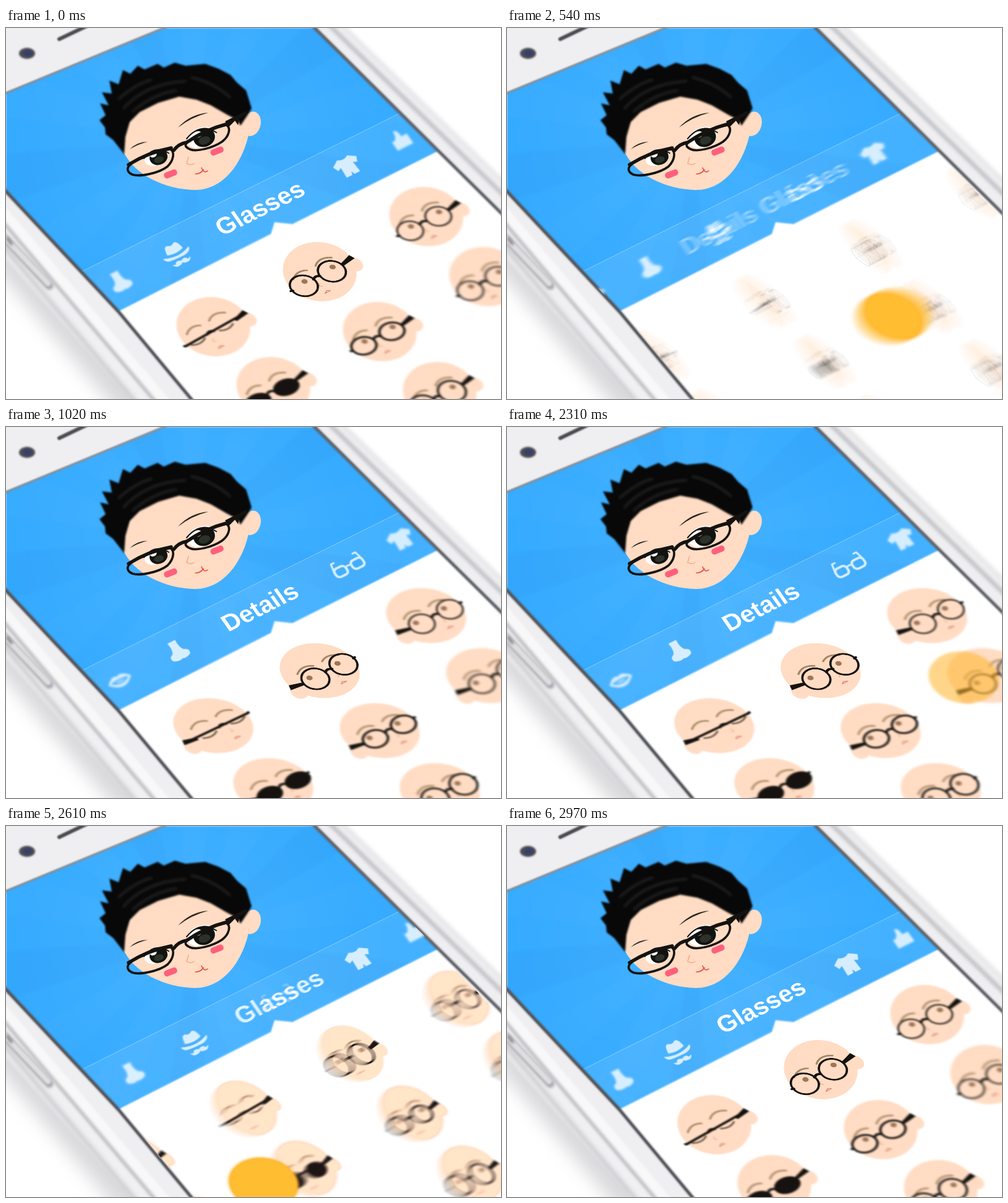
Recreate the animation shown at these times as an HTML page with a canvas. Size 800 by 600 pixels, loop 3.57 s.

```html
<!DOCTYPE html>
<html>
<head>
<meta charset="utf-8">
<style>
html, body { margin: 0; width: 100%; height: 100%; overflow: hidden; background: #fff; }
canvas { display: block; }
</style>
</head>
<body>
<canvas id="stage" width="800" height="600"></canvas>
<script>
const LOOP = 3570, STEP = 30, SWIPE = 660, SWIPE_RIGHT = 360, SWIPE_LEFT = 2310;
const SKIN = '#ffdcc3', INK = '#15120f';

const ctx = document.getElementById('stage').getContext('2d');
const clamp = x => Math.max(0, Math.min(1, x));
const mix = (a, b, p) => a + (b - a) * p;

function makeCanvas(w, h) {
  const c = document.createElement('canvas');
  c.width = w;
  c.height = h;
  return c.getContext('2d');
}

function fill(g, path, color, blur = 0) {
  g.filter = blur ? `blur(${blur}px)` : 'none';
  g.fillStyle = color;
  g.fill(new Path2D(path));
  g.filter = 'none';
}

function stroke(g, path, color, width, blur = 0) {
  g.filter = blur ? `blur(${blur}px)` : 'none';
  g.strokeStyle = color;
  g.lineWidth = width;
  g.stroke(new Path2D(path));
  g.filter = 'none';
}

function ellipse(g, x, y, rx, ry, angle, color, line) {
  g.beginPath();
  g.ellipse(x, y, rx, ry, angle, 0, 7);
  if (line) {
    g.strokeStyle = color;
    g.lineWidth = line;
    g.stroke();
  } else {
    g.fillStyle = color;
    g.fill();
  }
}

// A square picture centred on the origin, kept at double resolution.
function makeSprite(size, blur, draw) {
  const sharp = makeCanvas(size * 2, size * 2);
  sharp.setTransform(2, 0, 0, 2, size, size);
  sharp.lineCap = sharp.lineJoin = 'round';
  draw(sharp);
  const soft = makeCanvas(size * 2, size * 2);
  if (blur) soft.filter = `blur(${blur * 2}px)`;
  soft.drawImage(sharp.canvas, 0, 0);
  return { image: soft.canvas, size };
}

function drawSprite(g, sprite, x, y, axes, flip = 1) {
  const s = sprite.size;
  g.setTransform(axes[0] * flip, axes[1] * flip, axes[2], axes[3], x, y);
  g.drawImage(sprite.image, -s / 2, -s / 2, s, s);
}

// ---- still parts -------------------------------------------------------

const SCREEN = 'M0 105L256 0H498L698 199L800 301V600H301L182 458L0 263Z';
const HEADER = 'M0 105L256 0H498L698 199L463 317L434 314L428 333L182 458L0 263Z';
const BAND = 'M122 394L636 138L698 199L182 458Z';
const LIST = 'M185 459L428 333L434 314L463 317L695 201L796 303H800V600H304Z';

function drawPhone(g) {
  g.fillStyle = '#fff';
  g.fillRect(0, 0, 800, 600);
  fill(g, 'M-20 300L-20 385L180 620H300Z', '#d9d9dc', 14);
  fill(g, 'M-20 -20H525L820 268V620H220L-20 350Z', '#efeff1', 3);
  stroke(g, 'M517 -10L810 276', '#c3c4c8', 7, 2.5);
  stroke(g, 'M536 -10L810 256', '#e6e6e8', 8, 3);
  stroke(g, 'M-10 290L262 610', '#f8f8f9', 15, 2);
  stroke(g, 'M-10 308L246 610', '#bdbdc2', 5, 2);
  stroke(g, 'M-10 325L232 610', '#f0f0f2', 9, 2);
  stroke(g, 'M-10 347L214 610', '#c9c9cd', 6, 3);
  g.lineCap = 'round';
  stroke(g, 'M-5 337L70 417', '#a9a9ae', 13, 2);
  stroke(g, 'M-6 335L68 413', '#dededf', 9, 1.5);
  stroke(g, 'M2 340L9 349', '#77777c', 4, 2);

  fill(g, SCREEN, '#fff');
  g.save();
  g.clip(new Path2D(SCREEN));
  fill(g, HEADER, '#33aaff', 1);
  g.clip(new Path2D(HEADER));
  const glow = g.createRadialGradient(300, 180, 60, 300, 180, 330);
  glow.addColorStop(0, 'rgba(255,255,255,.07)');
  glow.addColorStop(1, 'rgba(255,255,255,0)');
  fill(g, HEADER, glow);
  for (let i = 0; i < 14; i++) {
    const a = i * Math.PI / 7 + .12, b = a + .25;
    fill(g, `M300 180L${300 + 600 * Math.cos(a)} ${180 + 600 * Math.sin(a)}` +
      `L${300 + 600 * Math.cos(b)} ${180 + 600 * Math.sin(b)}Z`,
      i % 3 ? 'rgba(255,255,255,.02)' : 'rgba(0,70,170,.03)', 2);
  }
  fill(g, BAND, 'rgba(255,255,255,.08)');
  stroke(g, 'M122 394L636 138', 'rgba(255,255,255,.35)', 1);
  g.restore();

  stroke(g, 'M-5 107L262 -3', '#75828f', 3, 1.3);
  stroke(g, 'M494 -5L698 198L810 309', '#55585f', 5, 1.4);
  stroke(g, 'M-5 259L182 459L306 608', '#46484e', 5, 1.4);
  stroke(g, 'M86 18L132 -4', '#4b4a4f', 6, 1.2);
  g.filter = 'blur(1.5px)';
  ellipse(g, 34, 41, 13, 9, 0, '#4c4a52');
  ellipse(g, 35, 41, 7, 5, 0, '#35406a');
  g.filter = 'none';
}

function drawAvatar(g) {
  g.lineCap = g.lineJoin = 'round';
  ellipse(g, 397, 155, 14.5, 20, .25, SKIN);
  fill(g, 'M188 196C185 150 230 100 285 100C340 100 396 130 392 172C384 212 355 262 305 262C258 261 205 238 188 196Z', SKIN);
  fill(g, 'M191 204L173 181L161 172L160 161L151 149L161 141L152 122L166 125L155 104L171 106' +
    'L167 85L182 91L189 68L201 74L213 61L224 67L245 58L255 64L273 56L290 61L322 58L344 66' +
    'L363 76L373 88L388 101L397 130L391 140L379 158L374 149L357 140L331 125L308 116' +
    'L280 111L246 121L216 136L200 152L193 176Z', '#080808', 1.6);
  stroke(g, 'M190 130Q225 90 290 86M182 115Q210 90 235 84M300 80Q335 88 362 112M205 135Q235 108 275 101',
    'rgba(100,100,105,.35)', 3, 2);

  fill(g, 'M200 196Q212 184 229 184Q213 188 200 196Z', '#2a2520', .5);
  fill(g, 'M278 161Q298 139 327 137Q300 144 278 161Z', '#2a2520', .5);
  drawEye(g, 243, 209, 20, 13);
  drawEye(g, 316, 177, 24, 16);
  stroke(g, 'M198 224C209 210 245 199 266 196C273 201 271 214 261 224C247 235 216 241 204 237C197 234 195 229 198 224Z', INK, 3.6);
  stroke(g, 'M291 187C304 173 333 161 356 157C364 161 361 175 349 184C334 194 308 201 297 196C291 193 289 191 291 187Z', INK, 3.6);
  stroke(g, 'M198 221Q230 201 267 194M271 198Q279 187 292 185Q323 164 358 155', INK, 5.5);
  fill(g, 'M354 151L388 134L390 139L377 147L375 157L370 150L360 160Z', INK);
  for (const [x, y] of [[266, 236], [341, 199]]) {
    g.save();
    g.translate(x, y);
    g.rotate(-.38);
    g.fillStyle = '#ff5f7c';
    g.beginPath();
    g.roundRect(-11, -5, 22, 10, 4.5);
    g.fill();
    g.restore();
  }
  stroke(g, 'M295 209L292 219Q299 223 304 219', '#efb08f', 1.6);
  stroke(g, 'M306 236Q315 236 319 229M316 226Q320 236 326 231', '#e84e45', 1.6);
}

function drawEye(g, x, y, rx, ry) {
  ellipse(g, x, y, rx, ry, -.35, '#fff');
  ellipse(g, x + rx * .18, y, rx * .74, ry * .95, -.35, '#11130f');
  ellipse(g, x + rx * .2, y + ry * .3, rx * .4, ry * .4, -.3, '#2c3129');
  ellipse(g, x - rx * .25, y - ry * .3, rx * .28, ry * .32, -.35, '#fff');
  stroke(g, `M${x - rx} ${y + 2}Q${x - 3} ${y - ry - 8} ${x + rx} ${y - ry * .5}`, INK, 2);
}

// ---- list of faces -----------------------------------------------------

const FACE_AXES = [.888, -.46, .707, .707];
const STYLES = {
  line: { rx: 0 },
  round: { rx: 20, ry: 20, width: 3.2 },
  thin: { rx: 19, ry: 18, width: 2.4 },
  oval: { rx: 19, ry: 16, width: 3.5 },
  shade: { rx: 21, ry: 15, filled: true }
};
const GRID = [
  [['line', 1.3], ['round', .3], ['thin', 1.6]],
  [['shade', 1.6], ['oval', 1.5], ['thin', 2]],
  [['oval', 2], ['round', 1.8], ['oval', 2]]
];

const faces = GRID.map(row => row.map(([name, blur]) => makeSprite(160, blur, g => {
  const style = STYLES[name];
  ellipse(g, 50, 16, 12, 14, 0, SKIN);
  ellipse(g, 0, 0, 57, 52.4, -Math.PI / 4, SKIN);
  stroke(g, 'M-41 -9Q-27 -20 -14 -12M2 -12Q16 -23 31 -12', '#a58763', 3);
  stroke(g, 'M-15 18Q-20 23 -14 24', '#e6a98d', 1.2);
  stroke(g, 'M-20 37L-14 34L-10 37Z', '#dd8878', 1.3);
  for (const x of [-36, 15]) {
    if (!style.rx) stroke(g, `M${x - 12} 11Q${x} 18 ${x + 12} 11`, '#604f40', 2.5);
    else if (style.filled) ellipse(g, x, 11, style.rx, style.ry, 0, INK);
    else {
      ellipse(g, x + 6, 3, 4.5, 4.5, 0, '#9b7658');
      ellipse(g, x, 9, style.rx, style.ry, 0, INK, style.width);
    }
  }
  if (!style.rx) stroke(g, 'M-57 8L54 4', INK, 4);
  stroke(g, 'M-58 7L-55 8M-17 7Q-10 2 -5 7', INK, 4);
  fill(g, 'M33 5L55 -2L58 7L35 10Z', INK);
})));

const stripEase = k => 1 - (1 - clamp((k - 60) / (SWIPE - 60))) ** 3;

function drawFaces(g, k, toRight, weight) {
  const p = 1 - (1 - clamp(k / SWIPE)) ** 2;
  const direction = toRight ? 1 : -1;
  const shift = direction * (p < .5 ? p : p - 1);
  const turn = Math.cos(Math.PI * stripEase(k));
  const flip = direction * Math.sign(turn) * Math.max(.3, Math.abs(turn));
  g.globalAlpha = weight * Math.min(1, .4 + Math.abs(turn));
  for (let row = 0; row < 3; row++)
    for (let col = -2; col < 4; col++) {
      const c = col + shift;
      drawSprite(g, faces[row][(col + 3) % 3], 335 + 172 * c + 97 * row, 483 - 89 * c + 97 * row, FACE_AXES, flip);
    }
}

// ---- category strip ----------------------------------------------------

const STRIP_AXES = [.893, -.449, .56, .81];
const SLOTS = [[97, 455], [184, 410], [277, 362], [410, 291], [552, 223], [638, 181], [730, 135]];

const solid = path => g => fill(g, path, '#fff');
const ICONS = [
  g => {
    fill(g, 'M-20 0Q-8 -14 0 -8Q8 -14 20 0Q0 22 -20 0Z', '#fff');
    stroke(g, 'M-13 0Q0 -3 13 0Q0 8 -13 0', '#55b7ff', 3);
  },
  solid('M-7 -18H7Q5 -5 10 2Q19 5 15 13Q6 18 0 15Q-6 18 -15 13Q-19 5 -10 2Q-5 -5 -7 -18Z'),
  g => {
    g.translate(-3, 4);
    fill(g, 'M-14 -6Q-12 -23 -5 -20Q0 -16 5 -20Q12 -23 14 -6Q0 -1 -14 -6Z', '#fff');
    fill(g, 'M-23 -4Q0 7 23 -4Q23 4 10 6Q-10 6 -18 4Q-23 1 -23 -4Z', '#fff');
    fill(g, 'M0 12Q8 7 11 14L16 12Q13 20 6 18Q2 18 0 15Q-2 18 -6 18Q-13 20 -16 12L-11 14Q-8 7 0 12Z', '#fff');
  },
  g => {
    g.strokeStyle = '#fff';
    g.lineWidth = 4;
    for (const x of [-25, 5]) {
      g.beginPath();
      g.roundRect(x, -3, 20, 16, 6);
      g.stroke();
    }
    stroke(g, 'M-5 3Q0 -1 5 3M-25 1L-22 -13L-17 -13M25 1L22 -13L17 -13', '#fff', 3);
  },
  solid('M-9 -16Q0 -10 9 -16L21 -8L17 1L11 -2L12 17H2L0 11L-2 17H-12L-11 -2L-17 1L-21 -8Z'),
  solid('M-3 -18Q4 -19 4 -5H14V14H-14V-3H-9Q-3 -8 -3 -18Z')
];
const icons = ICONS.map(draw => [.4, 1.8].map(blur => makeSprite(72, blur, draw)));

const label = text => makeSprite(190, .3, g => {
  g.font = 'bold 40px "Liberation Sans", Arial, sans-serif';
  g.textAlign = 'center';
  g.textBaseline = 'middle';
  g.fillStyle = '#fff';
  g.fillText(text, 0, 3);
});
const labels = { 2: label('Details'), 3: label('Glasses') };

function drawStrip(g, k, toRight, weight) {
  const p = stripEase(k);
  const focus = toRight ? 3 - p : 2 + p;
  icons.forEach((sprites, i) => {
    const slot = i - focus + 3;
    const left = Math.max(0, Math.min(5, Math.floor(slot)));
    const [a, b] = [SLOTS[left], SLOTS[left + 1]];
    const x = mix(a[0], b[0], slot - left), y = mix(a[1], b[1], slot - left);
    const distance = Math.abs(i - focus);
    g.globalAlpha = weight * .78 * (labels[i] ? clamp(distance * 1.4) : 1);
    drawSprite(g, sprites[distance > 1.4 ? 1 : 0], x, y, STRIP_AXES);
    if (labels[i]) {
      g.globalAlpha = weight * clamp(1.15 - distance * 1.5);
      drawSprite(g, labels[i], x, y, STRIP_AXES);
    }
  });
}

// ---- touch dot ---------------------------------------------------------

const dot = makeSprite(130, 2, g => ellipse(g, 0, 0, 50, 50, 0, '#ffb52a'));

function drawDot(g, k, toRight, weight) {
  const u = clamp(k / 300), p = u * u * (3 - 2 * u);
  const along = toRight ? 1 - p : p;
  g.globalAlpha = weight;
  drawSprite(g, dot, mix(738, 416, along), mix(405, 578, along), FACE_AXES);
}

// ---- playback ----------------------------------------------------------

const still = makeCanvas(800, 600);
drawPhone(still);
drawAvatar(still);

const layer = makeCanvas(800, 600);

// Averages several moments around k, then puts the result on the stage.
function smear(draw, k, toRight, shutter, clip, alpha = 1) {
  const count = shutter > 1 ? 10 : 1;
  layer.setTransform(1, 0, 0, 1, 0, 0);
  layer.clearRect(0, 0, 800, 600);
  layer.globalCompositeOperation = 'lighter';
  for (let i = 0; i < count; i++) {
    const offset = count > 1 ? i / (count - 1) - .5 : 0;
    draw(layer, k + shutter * offset, toRight, 1 / count);
  }
  ctx.save();
  if (clip) ctx.clip(new Path2D(clip));
  ctx.globalAlpha = alpha;
  ctx.drawImage(layer.canvas, 0, 0);
  ctx.restore();
}

function render(time) {
  const t = Math.floor(time % LOOP / STEP) * STEP;
  const toRight = t < SWIPE_LEFT;
  const k = t - (toRight ? SWIPE_RIGHT : SWIPE_LEFT);
  const shutter = k > 0 && k < SWIPE ? 110 * (1 - k / SWIPE) ** 2 : 0;

  ctx.drawImage(still.canvas, 0, 0);
  smear(drawFaces, k, toRight, shutter, LIST);
  smear(drawStrip, k, toRight, shutter / 3, BAND);
  if (k >= 0 && k < 390) {
    const alpha = Math.min(1, .55 + k / 130) * clamp((390 - k) / 90);
    smear(drawDot, k, toRight, k ? 15 : 0, null, alpha);
  }
}

const start = performance.now();
function tick() {
  render(performance.now() - start);
  requestAnimationFrame(tick);
}
tick();
</script>
</body>
</html>
```
